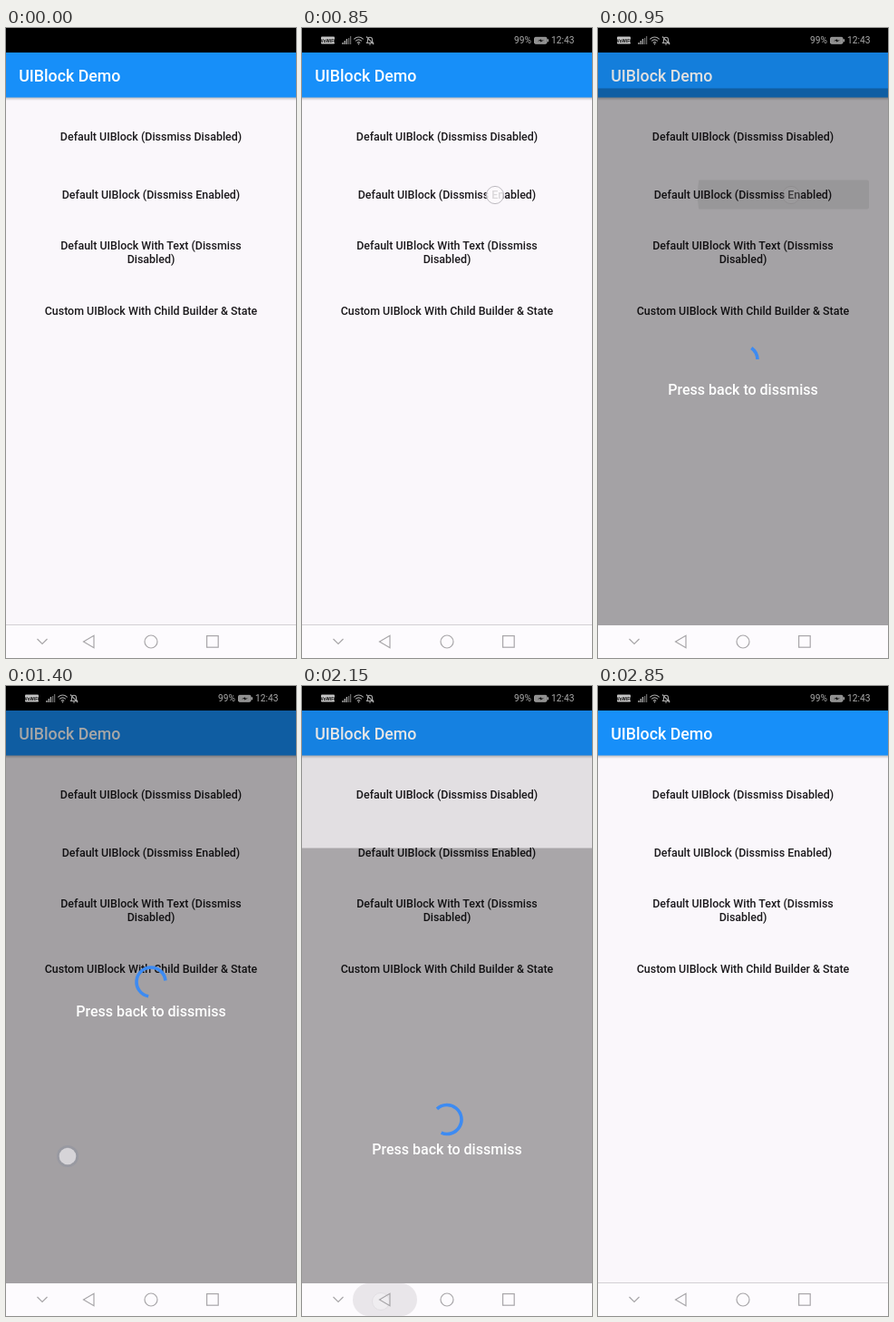
These frames come from a looping animation (320 by 694 pixels, 3.15 s). An HTML page:

```html
<!DOCTYPE html>
<html lang="en">
<head>
<meta charset="utf-8">
<title>UIBlock Demo</title>
<style>
html, body { margin: 0; width: 100%; height: 100%; overflow: hidden; background: #000; }
svg { display: block; width: 320px; height: 694px; }
text { font-family: Roboto, Arial, sans-serif; font-weight: 500; }
.item { font-size: 12.444px; fill: #1b191c; text-anchor: middle; }
.status text { font-size: 10.2px; font-weight: 400; fill: #ababab; }
.line { fill: none; stroke: #a8a6a9; stroke-width: 1.2; }
</style>
</head>
<body>
<svg viewBox="0 0 320 694">
  <defs>
    <linearGradient id="shade" x2="0" y2="1">
      <stop stop-color="#000" stop-opacity=".26"/>
      <stop offset="1" stop-color="#000" stop-opacity="0"/>
    </linearGradient>
    <clipPath id="button"><rect x="21" y="167.5" width="278" height="32" rx="2"/></clipPath>
    <clipPath id="page"><rect y="27" width="320" height="631"/></clipPath>
    <clipPath id="navClip"><rect y="658" width="320" height="36"/></clipPath>
    <g id="dot">
      <circle r="12" fill="#8b90a0" fill-opacity=".45"/>
      <circle r="9.3" fill="#dedcdf" fill-opacity=".88"/>
    </g>
  </defs>

  <rect y="27" width="320" height="631" fill="#faf7fb"/>
  <rect y="76" width="320" height="4" fill="url(#shade)"/>
  <rect y="27" width="320" height="49.5" fill="#178ff9"/>
  <text x="14.2" y="58.8" font-size="17.78" fill="#fff">UIBlock Demo</text>
  <g clip-path="url(#button)"><circle id="ripple" cx="213" cy="184" fill="#000"/></g>
  <g class="item">
    <text x="160" y="123.5">Default UIBlock (Dissmiss Disabled)</text>
    <text x="160" y="187.5">Default UIBlock (Dissmiss Enabled)</text>
    <text x="160" y="244.4">Default UIBlock With Text (Dissmiss</text>
    <text x="160" y="259">Disabled)</text>
    <text x="160" y="315.7">Custom UIBlock With Child Builder &amp; State</text>
  </g>
  <g id="tapButton" transform="translate(213 184)">
    <circle r="9.6" fill="#fbf9fc" fill-opacity=".85" stroke="#bdbac0" stroke-width="1"/>
  </g>

  <g id="block" clip-path="url(#page)">
    <rect id="barrier" y="27" width="320" height="631"/>
    <g id="sheet">
      <rect y="27" width="320" height="631" fill-opacity=".255"/>
      <path id="arc" fill="none" stroke="#3d8bf2" stroke-width="3.6"/>
      <text x="160" y="364.2" font-size="16" fill="#fff" text-anchor="middle">Press back to dissmiss</text>
    </g>
  </g>
  <use id="tapPage" href="#dot" x="68" y="518"/>

  <rect y="658" width="320" height="36" fill="#fdfbfe"/>
  <rect id="rule" y="657" width="320" height="1" fill="#d2d0d3"/>
  <g clip-path="url(#navClip)">
    <rect id="pill" y="658" height="36" rx="18" fill="#e9e6ea"/>
    <circle id="tapBack" cx="87" cy="678" r="9.5" fill="#f6f4f7" stroke="#d9d7db"/>
  </g>
  <g class="line">
    <path d="M34.5 673l5.5 5.5 5.5-5.5M85.5 676l11.5-6.8v13.6z"/>
    <circle cx="160" cy="676" r="7"/>
    <rect x="221.6" y="669.6" width="12.6" height="12.6"/>
  </g>

  <rect width="320" height="27"/>
  <g id="status" class="status">
    <rect x="21" y="9.5" width="15" height="8" rx="1" fill="#c4c4c4"/>
    <text x="28.5" y="15.7" text-anchor="middle" style="font-size:5px;font-weight:700;fill:#111">VoWiFi</text>
    <path d="M45 18v-2M47.2 18v-4M49.4 18v-6" stroke="#ababab" stroke-width="1.4"/>
    <path d="M51.6 18v-7M53.6 18v-9" stroke="#666" stroke-width="1.3"/>
    <g fill="none" stroke="#ababab" stroke-width="1.1">
      <path d="M57.3 12.3q5.2-4.6 10.4 0M59.1 14.4q3.4-3 6.8 0M60.8 16.4q1.7-1.5 3.4 0"/>
      <path d="M71.5 16.5h7l-1-1.6v-2.2q0-2.4-2.5-2.4t-2.5 2.4v2.2zM74 18h2M71 9.5l8.2 8.6"/>
    </g>
    <circle cx="62.5" cy="17.7" r=".8" fill="#ababab"/>
    <text x="234" y="17.4">99%</text>
    <rect x="256.5" y="10.3" width="13.5" height="7" rx="1.3" fill="#8e8e8e" stroke="#b0b0b0" stroke-width=".8"/>
    <path d="M271.3 12.3v3" stroke="#b0b0b0" stroke-width="1.4"/>
    <path d="M260 14.2l4-2v1.2h3l-4 2.2v-1.4z" fill="#111"/>
    <text x="275" y="17.4">12:43</text>
  </g>
</svg>
<script>
const LOOP = 3150, STEP = 50, TRAVEL = 631;
const $ = id => document.getElementById(id);
const set = (id, attrs) => {
  for (const k in attrs) $(id).setAttribute(k, attrs[k]);
};
const clamp = x => Math.min(1, Math.max(0, x));
const span = (t, a, b) => clamp((t - a) / (b - a));
const fade = (t, inA, inB, outA, outB) => span(t, inA, inB) * (1 - span(t, outA, outB));

// cubic-bezier(.4, 0, .2, 1)
function fastOutSlowIn(x) {
  let lo = 0, hi = 1, u = 0;
  for (let i = 0; i < 24; i++) {
    u = (lo + hi) / 2;
    const v = 1 - u;
    if (1.2 * v * v * u + 0.6 * v * u * u + u ** 3 < x) lo = u; else hi = u;
  }
  return u * u * (3 - 2 * u);
}

// Material indeterminate spinner: head runs ahead, then the tail catches up.
function spinner(turns) {
  const p = ((turns % 1) + 1) % 1;
  const head = 270 * fastOutSlowIn(clamp(p * 2));
  const tail = 270 * fastOutSlowIn(clamp(p * 2 - 1));
  const start = -90 + tail + 216 * turns + 90 * p;
  const end = start + Math.max(head - tail, 0.1);
  const at = deg => {
    const a = deg * Math.PI / 180;
    return (160 + 16 * Math.cos(a)).toFixed(2) + ' ' + (326 + 16 * Math.sin(a)).toFixed(2);
  };
  return `M${at(start)}A16 16 0 ${end - start > 180 ? 1 : 0} 1 ${at(end)}`;
}

function draw(t) {
  set('status', { opacity: t < 50 ? 0 : 1 });

  const open = t < 1500 ? span(t, 850, 1050) : 1 - span(t, 2010, 2210);
  const offset = TRAVEL * (1 - open) ** 4;
  set('block', { visibility: open > 0 ? 'visible' : 'hidden' });
  set('barrier', { 'fill-opacity': 0.13 * (1 - offset / TRAVEL) });
  set('sheet', { transform: `translate(0 ${offset.toFixed(2)})` });
  set('arc', { d: spinner((t - 835) / 990) });
  set('rule', { opacity: open > 0 ? 0 : 1 });

  set('ripple', {
    r: 280 * span(t, 890, 1053),
    'fill-opacity': 0.07 * fade(t, 850, 900, 1000, 1200)
  });
  set('tapButton', { opacity: fade(t, 650, 750, 850, 1000) });
  set('tapPage', { opacity: fade(t, 1200, 1300, 1500, 1700) });

  const grow = span(t, 1950, 2150);
  set('pill', {
    x: 91.5 - 35.5 * grow,
    width: 71 * grow,
    opacity: 1 - span(t, 2150, 2300)
  });
  set('tapBack', { opacity: 0.8 * fade(t, 1900, 2000, 2100, 2250) });
}

const begin = performance.now();
function tick() {
  const t = (performance.now() - begin) % LOOP;
  draw(Math.floor(t / STEP) * STEP);
  requestAnimationFrame(tick);
}
tick();
</script>
</body>
</html>
```
